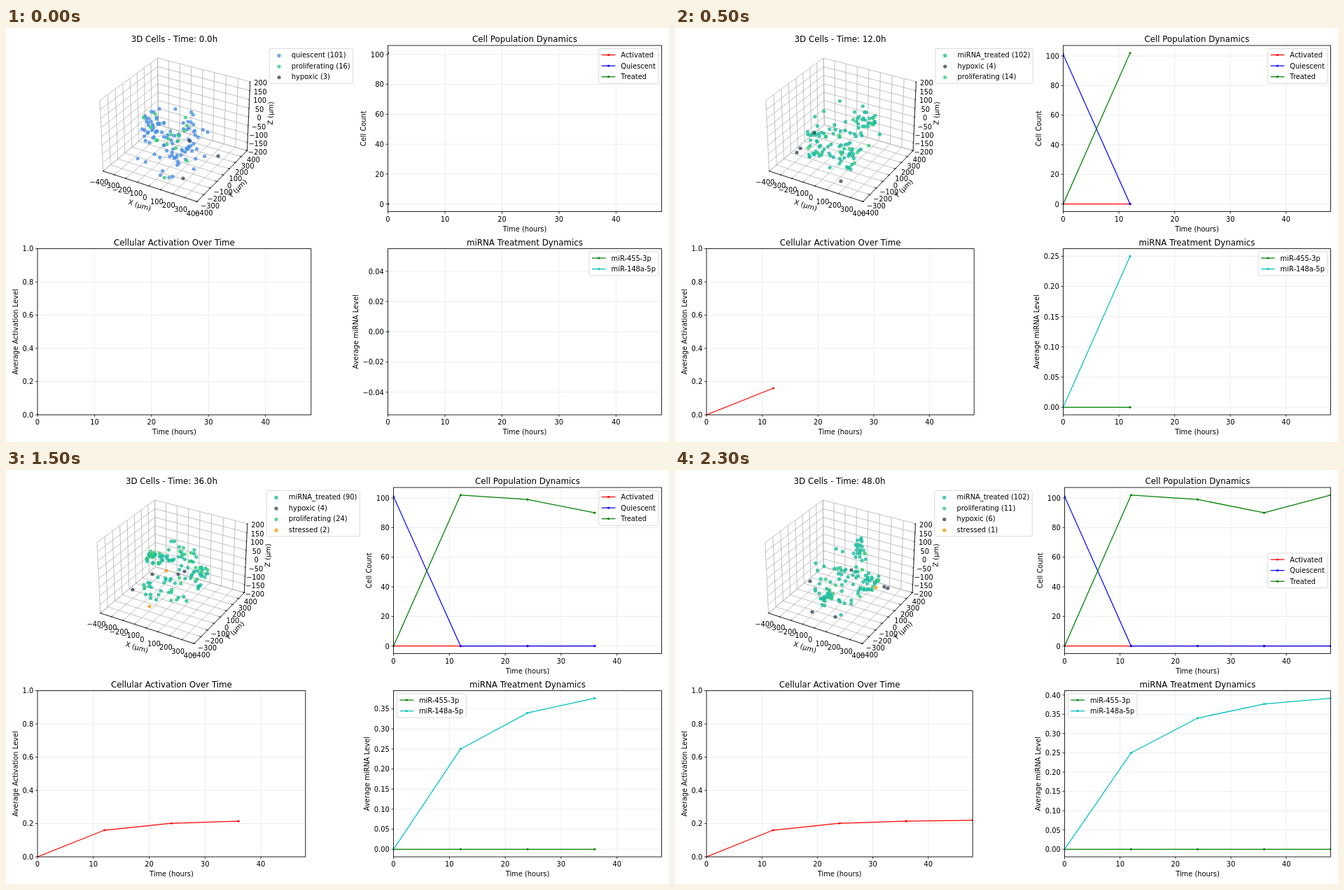
An HTML page that plays this animation: 947x592 px, repeating every 2500 ms.

```html
<!DOCTYPE html>
<html lang="en">
<head>
<meta charset="utf-8">
<title>Cell simulation dashboard</title>
<style>
html, body { margin: 0; width: 947px; height: 592px; overflow: hidden; background: #fff; }
svg { display: block; font-family: "DejaVu Sans", sans-serif; }
</style>
</head>
<body>
<svg id="stage" width="947" height="592" viewBox="0 0 947 592"></svg>
<script>
const FONT = 9.87, STEP = 500;
const TOP = { y0: 25, y1: 262.5 }, BOTTOM = { y0: 315.6, y1: 553.1 };
const COLORS = { quiescent: '#4a90e2', proliferating: '#2ecc71', hypoxic: '#34495e',
  miRNA_treated: '#1abc9c', stressed: '#f39c12' };

const activation = [0, .1604, .2015, .2145, .2195];
const mir148 = [0, .25, .34, .3765, .3915];
const activated = [0, 0, 0, 0, 0];
const quiescent = [101, 0, 0, 0, 0];
const treated = [0, 102, 99, 90, 102];

// left: x of the right-hand plots; right: end of the left-hand ones
// clusters: centre and radii of the ellipses the cells are scattered in
const states = [
  { left: 545.5, right: 435.8,
    cells: { quiescent: 101, proliferating: 16, hypoxic: 3 },
    fixed: { hypoxic: [[303, 183], [253, 215], [262, 161]] },
    clusters: [[204, 140, 14, 24], [228, 150, 20, 22], [263, 150, 13, 30], [245, 178, 30, 18], [238, 163, 56, 53]] },
  { left: 554.5, right: 427.2,
    cells: { miRNA_treated: 102, hypoxic: 4, proliferating: 14 },
    fixed: { hypoxic: [[199, 150], [179, 172], [174, 178], [237, 219]] },
    clusters: [[200, 165, 12, 28], [274, 132, 15, 12], [249, 172, 17, 30], [224, 170, 30, 26], [240, 152, 53, 54]] },
  { left: 553.5, right: 427.5,
    cells: { miRNA_treated: 99, proliferating: 16, stressed: 1, hypoxic: 4 },
    fixed: { stressed: [[203, 154]], hypoxic: [[190, 157], [185, 192], [214, 205], [218, 133]] },
    clusters: [[226, 129, 24, 9], [292, 139, 12, 9], [247, 140, 25, 22], [232, 182, 45, 17], [245, 155, 52, 46]] },
  { left: 553.5, right: 427.8,
    cells: { miRNA_treated: 90, hypoxic: 4, proliferating: 24, stressed: 2 },
    fixed: { hypoxic: [[209, 149], [246, 149], [255, 145], [181, 171]], stressed: [[229, 144], [205, 195]] },
    clusters: [[212, 126, 14, 9], [250, 121, 24, 12], [277, 153, 14, 16], [226, 170, 32, 24], [240, 154, 47, 54]] },
  { left: 556.5, right: 425.2,
    cells: { miRNA_treated: 102, proliferating: 11, hypoxic: 6, stressed: 1 },
    fixed: { hypoxic: [[193, 159], [196, 203], [229, 210], [299, 167], [304, 169], [252, 143]], stressed: [[287, 168]] },
    clusters: [[264, 121, 10, 25], [279, 160, 17, 15], [214, 174, 15, 20], [246, 164, 30, 30], [238, 159, 48, 50]] }
];

const pen = document.createElement('canvas').getContext('2d');
pen.font = `${FONT}px "DejaVu Sans", sans-serif`;
const range = (from, to, step) =>
  Array.from({ length: Math.floor((to - from) / step + 1.001) }, (_, i) => from + i * step);
const minus = s => String(s).replace('-', '\u2212');

const line = (a, b, color, width) =>
  `<line x1="${a[0]}" y1="${a[1]}" x2="${b[0]}" y2="${b[1]}" stroke="${color}" stroke-width="${width}"/>`;
const dot = (x, y, r, color, alpha = 1) =>
  `<circle cx="${x}" cy="${y}" r="${r}" fill="${color}" fill-opacity="${alpha}"/>`;
const text = (x, y, s, anchor = 'middle', size = FONT) =>
  `<text x="${x}" y="${y}" text-anchor="${anchor}" font-size="${size}">${s}</text>`;
const turned = (x, y, s, angle) =>
  `<g transform="translate(${x} ${y}) rotate(${angle})">${text(0, 3.4, s)}</g>`;
const title = (x, y, s) => text(x, y, s, 'middle', FONT * 1.2);

const legendWidth = rows => 35.5 + Math.max(...rows.map(r => pen.measureText(r[0]).width));

function legend(x, y, rows, symbol) {
  return `<rect x="${x}" y="${y}" width="${legendWidth(rows)}" height="${rows.length * 15.6 + 3}" rx="2"
    fill="#fff" fill-opacity=".8" stroke="#ccc" stroke-opacity=".8" stroke-width=".9"/>` +
    rows.map(([name, color], i) => {
      const cy = y + 9.3 + i * 15.6;
      return symbol(x + 13.8, cy, color) + text(x + 31.6, cy + 3.4, name, 'start');
    }).join('');
}
const lineSymbol = (x, y, color) =>
  line([x - 9.9, y - .2], [x + 9.9, y - .2], color, 1.25) + dot(x, y - .2, 1.6, color);
const cellSymbol = (x, y, color) => dot(x, y + .6, 2.6, color, .8);

function plot(p, count) {
  const { x0, x1, y0, y1, min, max } = p;
  const X = h => x0 + (x1 - x0) * h / 48;
  const Y = v => y1 - (y1 - y0) * (v - min) / (max - min);
  let grid = '', ticks = '', curves = '';
  for (const h of range(0, 40, 10)) {
    grid += line([X(h), y0], [X(h), y1], '#e7e7e7', .8);
    ticks += line([X(h), y1], [X(h), y1 + 3], '#000', .8) + text(X(h), y1 + 14, h);
  }
  for (const v of p.ticks) {
    grid += line([x0, Y(v)], [x1, Y(v)], '#e7e7e7', .8);
    ticks += line([x0 - 3, Y(v)], [x0, Y(v)], '#000', .8) +
      text(x0 - 5.8, Y(v) + 3.8, minus(v.toFixed(p.digits)), 'end');
  }
  for (const [, color, data] of p.series) {
    const pts = data.slice(0, count).map((v, i) => [X(i * 12), Y(v)]);
    curves += `<polyline points="${pts.join(' ')}" fill="none" stroke="${color}" stroke-width="1.25" stroke-linejoin="round"/>` +
      pts.map(q => dot(...q, 1.6, color)).join('');
  }
  const box = `x="${x0}" y="${y0}" width="${x1 - x0}" height="${y1 - y0}"`;
  return `<clipPath id="${p.id}"><rect ${box}/></clipPath>${grid}<g clip-path="url(#${p.id})">${curves}</g>
    <rect ${box} fill="none" stroke="#000" stroke-width=".85"/>${ticks}` +
    title((x0 + x1) / 2, y0 - 4.9, p.title) +
    text((x0 + x1) / 2, y1 + 28, 'Time (hours)') +
    turned(p.labelX, (y0 + y1) / 2, p.label, -90);
}

// Perspective view, elevation 30 degrees, azimuth -60 degrees
function project(x, y, z, cx) {
  const a = x / 700, b = y / 700, c = z / 466.7;
  const k = 1345 / (10 - .433 * a + .75 * b - .5 * c);
  return [cx + k * (.866 * a + .5 * b), 140.9 - k * (-.25 * a + .433 * b + .866 * c)];
}

function space(cx) {
  const P = (x, y, z) => project(x, y, z, cx);
  const wide = range(-400, 400, 100), tall = range(-200, 200, 50);
  const path = (...pts) =>
    `<polyline points="${pts.map(q => P(...q)).join(' ')}" fill="none" stroke="#b0b0b0" stroke-width=".8"/>`;
  let grid = '', ticks = '';
  const tick = (a, b, at, dx, dy, value) => {
    const [x, y] = P(...at);
    ticks += line(P(...a), P(...b), '#000', .8) + text(x + dx, y + dy + 3.5, minus(value));
  };
  for (const v of wide) {
    grid += path([v, -400, -200], [v, 400, -200], [v, 400, 200]) +
      path([400, v, -200], [-400, v, -200], [-400, v, 200]);
    tick([v, -408, -200], [v, -385, -200], [v, -400, -200], -5.7, 16.4 + v / 400, v);
    tick([408, v, -200], [385, v, -200], [400, v, -200], 9, 14.8 - v / 270, v);
  }
  for (const v of tall) {
    grid += path([-400, -400, v], [-400, 400, v], [400, 400, v]);
    tick([400, 408, v], [400, 385, v], [400, 400, v], 15, 1.8, v);
  }
  const front = P(400, -400, -200), corner = P(400, 400, -200);
  return grid + line(P(-400, -400, -200), front, '#000', .8) + line(front, corner, '#000', .8) +
    line(corner, P(400, 400, 200), '#000', .8) + ticks +
    turned(cx - 52.5, 253.5, 'X (µm)', 17) + turned(cx + 87.5, 229.5, 'Y (µm)', -44.5) +
    turned(cx + 134.5, 122, 'Z (µm)', -88);
}

function seeded(seed) {
  return () => {
    seed = seed + 0x6D2B79F5 | 0;
    let t = Math.imul(seed ^ seed >>> 15, 1 | seed);
    t = t + Math.imul(t ^ t >>> 7, 61 | t) ^ t;
    return ((t ^ t >>> 14) >>> 0) / 4294967296;
  };
}

function cells(state, seed) {
  const random = seeded(seed);
  let n = 0, out = '';
  for (const [kind, count] of Object.entries(state.cells)) {
    if (state.fixed[kind]) continue;
    for (let i = 0; i < count; i++) {
      const [x, y, rx, ry] = state.clusters[n++ % state.clusters.length];
      const angle = random() * 2 * Math.PI, r = Math.sqrt(random());
      out += dot(x + rx * r * Math.cos(angle), y + ry * r * Math.sin(angle), 2.6, COLORS[kind], .8);
    }
  }
  for (const [kind, places] of Object.entries(state.fixed))
    for (const [x, y] of places) out += dot(x, y, 2.6, COLORS[kind], .8);
  return out;
}

function draw(i) {
  const state = states[i], x0 = state.left, mid = (45 + state.right) / 2, count = i + 1;
  const people = Math.max(...quiescent.slice(0, count), ...treated.slice(0, count));
  const level = mir148[i];
  const population = [['Activated', '#f00', activated], ['Quiescent', '#00f', quiescent], ['Treated', '#008000', treated]];
  const mirna = [['miR-455-3p', '#008000', activated], ['miR-148a-5p', '#00bfbf', mir148]];
  const kinds = Object.entries(state.cells).map(([kind, n]) => [`${kind} (${n})`, COLORS[kind]]);
  const edge = rows => 931.8 - legendWidth(rows);

  document.getElementById('stage').innerHTML =
    space(mid + 3) + cells(state, count) +
    title(mid, 20.1, `3D Cells - Time: ${(i * 12).toFixed(1)}h`) +
    legend(mid + 135.8, 29.5, kinds, cellSymbol) +
    plot({ id: 'population', x0, x1: 936.5, ...TOP, min: -people * .05, max: people * 1.05,
      ticks: range(0, 100, 20), digits: 0, series: population,
      title: 'Cell Population Dynamics', label: 'Cell Count', labelX: x0 - 34.5 }, count) +
    legend(edge(population), i === 4 ? 118.9 : 29.4, population, lineSymbol) +
    plot({ id: 'activation', x0: 45, x1: state.right, ...BOTTOM, min: 0, max: 1,
      ticks: range(0, 1, .2), digits: 1, series: [['', '#f00', activation]],
      title: 'Cellular Activation Over Time', label: 'Average Activation Level', labelX: 14 }, count) +
    plot({ id: 'mirna', x0, x1: 936.5, ...BOTTOM,
      min: i ? -level * .05 : -.055, max: i ? level * 1.05 : .055,
      ticks: i ? range(0, level * 1.05, .05) : range(-.04, .04, .02), digits: 2, series: mirna,
      title: 'miRNA Treatment Dynamics', label: 'Average miRNA Level', labelX: x0 - (i ? 37.5 : 45.5) }, count) +
    legend(i > 2 ? x0 + 4.9 : edge(mirna), 319.9, mirna, lineSymbol);
}

let shown = -1;
function tick() {
  const i = Math.floor(performance.now() / STEP) % states.length;
  if (i !== shown) draw(shown = i);
  requestAnimationFrame(tick);
}
tick();
</script>
</body>
</html>
```
